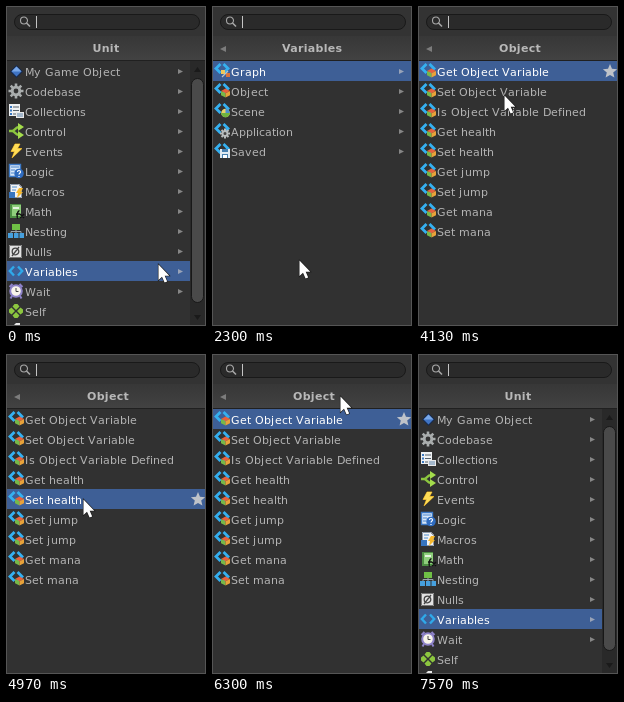
Write an HTML page with a canvas that moves like this. It is 200x320 px and loops after 9430 ms.

```html
<!DOCTYPE html>
<html lang="en">
<head>
<meta charset="utf-8">
<title>Unit finder</title>
<style>
html, body { margin: 0; width: 100%; height: 100%; overflow: hidden; background: #313131; }
canvas { display: block; }
</style>
</head>
<body>
<canvas id="stage" width="200" height="320"></canvas>
<script>
const ctx = document.getElementById('stage').getContext('2d');
const LOOP = 9430, WIDTH = 200, HEIGHT = 320, LIST_TOP = 55, ROW = 20;
const FONT = '11px Verdana, "DejaVu Sans", sans-serif';

// Icons live in a 16 x 16 box; each part is [colour, path, stroke width or 0 for fill].
const GEAR = 'M8 .5V15.5M.5 8H15.5M2.7 2.7L13.3 13.3M13.3 2.7L2.7 13.3';
const ring = (x, y, r) => `M${x - r} ${y}a${r} ${r} 0 1 0 ${2 * r} 0a${r} ${r} 0 1 0 ${-2 * r} 0z`;
const page = [['#f2f2f2', 'M2 1H11L14 4V15H2z', 0], ['#8a97a8', 'M2.5 1.5H10.5L13.5 4.5V14.5H2.5z', 1]];
const BOLT = 'M7 1H12L9.5 5.5H14L4 15 6.5 8.5H3z';

const icons = {
  object: [['#16294d', 'M8.5 2L15 8.5 8.5 15 2 8.5z', 0], ['#3f74c4', 'M8.5 3.5L13.5 8.5 8.5 13.5 3.5 8.5z', 0],
    ['#79a8e8', 'M8.5 3.5L13.5 8.5H3.5z', 0]],
  codebase: [['#a9adad', GEAR, 2.6], ['#a9adad', ring(8, 8, 4), 2.5], ['#333', ring(8, 8, 2.4), 0]],
  collections: [['#eef1f3', 'M1 1H12V13H1z', 0], ['#3a78c0', 'M2 3H4V5H2zM2 6.5H4V8.5H2zM2 10H4V12H2z', 0],
    ['#55606a', 'M5 4H11M5 7.5H11M5 11H11', 1.2], ['#e8e8e8', 'M8 9H16V15H8z', 0], ['#5e86ae', 'M9 11H15M9 13H15', 1]],
  control: [['#8cc63f', 'M1 8H4C7 8 7 4 11 4M4 8C7 8 7 12 11 12', 2.5], ['#a4dc4c', 'M10 0L16 4 10 8zM10 8L16 12 10 16z', 0]],
  events: [['#c89016', BOLT, 1], ['#ffdc55', BOLT, 0]],
  logic: [['#d8e7f8', 'M1 1H13V14H1z', 0], ['#3c79c6', 'M1.5 1.5H12.5V13.5H1.5z', 1.4],
    ['#4683cc', 'M3 4H11M3 7H7M3 10H6', 1], ['#2f6cc0', ring(11, 10.5, 4.8), 0],
    ['#fff', 'M9.5 9C9.5 7 12.5 7 12.5 9 12.5 10 11 10 11 11.5M11 13V14', 1.2]],
  macros: [...page, ['#4c8ed0', 'M4 4H9M4 7H8', 1], ['#3775bf', 'M1 9H7V15H1z', 0],
    ['#f5b82e', 'M11 5H15L13 9H15L9 15 10 10H8z', 0]],
  math: [['#4d8f43', 'M2 1H13V15H2z', 0], ['#8fce7c', 'M4 2H13V13H4z', 0], ['#e5f4df', 'M5 4H11V6H5z', 0],
    ['#101010', 'M10 15C8.5 16 9 7 11.5 8M8 11H12M12 11L16 15M16 11L12 15', 1.4]],
  nesting: [['#9aa4ab', 'M8 5V9M3 11V8.5H13V11M8 8V11', 1], ['#6fbf45', 'M4 1H12V7H4z', 0],
    ['#46a0de', 'M0 10H5V15H0zM6 10H10.5V15H6zM11.5 10H16V15H11.5z', 0]],
  nulls: [['#e3e3e3', 'M1 2H14V15H1z', 0], ['#777', 'M1.5 2.5H13.5V14.5H1.5z', 1],
    ['#444', ring(7.5, 8.5, 3.3) + 'M4 13L11 4', 1.3]],
  variables: [['#2fa9ea', 'M6 3.5L1.8 8 6 12.5M10 3.5L14.2 8 10 12.5', 2.4]],
  wait: [['#8d82c8', 'M1.5 4L4.5 1M14.5 4L11.5 1M4 13L2.5 15.5M12 13L13.5 15.5', 2], ['#8d82c8', ring(8, 8, 6.8), 0],
    ['#f7f4ea', ring(8, 8, 4.8), 0], ['#444', 'M8 5V8.5H10.5', 1]],
  self: [['#8cc63f', 'M8 7L4.5 3.5 6.5 1H9.5L11.5 3.5zM8 9L4.5 12.5 6.5 15H9.5L11.5 12.5zM7 8L3.5 4.5 1 6.5V9.5L3.5 11.5zM9 8L12.5 4.5 15 6.5V9.5L12.5 11.5z', 0]],
  more: [['#e8e8e8', 'M5 3L8 0H12V8H5z', 0]]
};

// A variable icon: chevrons with a badge in the lower right.
const badge = (...parts) => [['#35b0f0', 'M6.5 1L2 5.5 6.5 10M9.5 1L14 5.5 9.5 10', 2.8], ...parts];
Object.assign(icons, {
  graph: badge(['#f0c75a', 'M7 7H11V11H7z', 0], ['#d9743c', 'M12 10H16V14H12z', 0], ['#b9c3c9', 'M8 14L14 8', 1.3]),
  cube: badge(['#e8603c', 'M11.5 5.5L16 8 11.5 10.2 7 8z', 0], ['#78b848', 'M7 8L11.5 10.2V14.5L7 12.3z', 0],
    ['#e8a23a', 'M16 8L11.5 10.2V14.5L16 12.3z', 0]),
  scene: badge(['#e9d36a', ring(11.5, 10, 4.3), 0], ['#6fb43f', 'M7.2 10A4.3 4.3 0 0 0 15.8 10z', 0],
    ['#4a8fd0', 'M11.5 5.7A4.3 4.3 0 0 1 15.8 10H11.5z', 0]),
  application: badge(['#b8bcbc', 'M11 5.5V15.5M6 10.5H16M7.5 7L14.5 14M14.5 7L7.5 14', 2],
    ['#b8bcbc', ring(11, 10.5, 3.2), 0], ['#444', ring(11, 10.5, 1.5), 0]),
  saved: badge(['#dfe9f1', 'M6 6H16V15H6z', 0], ['#477fae', 'M8 6H14V9H8zM8 11H14V15H8z', 0], ['#fff', 'M9 12H13V15H9z', 0])
});

const panels = [
  { title: 'Unit', titleX: 86.5, scroll: true, rows: [
    ['My Game Object', 'object'], ['Codebase', 'codebase'], ['Collections', 'collections'],
    ['Control', 'control'], ['Events', 'events'], ['Logic', 'logic'], ['Macros', 'macros'],
    ['Math', 'math'], ['Nesting', 'nesting'], ['Nulls', 'nulls'], ['Variables', 'variables'],
    ['Wait', 'wait'], ['Self', 'self', true], ['Super', 'more', true]] },
  { title: 'Variables', titleX: 70, rows: ['Graph', 'Object', 'Scene', 'Application', 'Saved']
    .map(name => [name, name === 'Object' ? 'cube' : name.toLowerCase()]) },
  { title: 'Object', titleX: 81, rows: ['Get Object Variable', 'Set Object Variable', 'Is Object Variable Defined',
    'Get health', 'Set health', 'Get jump', 'Set jump', 'Get mana', 'Set mana']
    .map(name => [name, 'cube', true]), stars: true }
];

const smooth = u => u * u * (3 - 2 * u);
const easeIn = u => u * u;
const easeOut = u => u * (2 - u);
const clamp = (v, lo, hi) => Math.min(hi, Math.max(lo, v));
const slide = (t, start) => smooth(clamp((t - start) / 250, 0, 1));

// Pointer stops: time, x, y, easing on the way there.
const stops = [
  [0, 152, 258], [320, 152, 258], [330, 151, 258], [450, 151, 258], [1000, 87, 260],
  [2210, 87, 260], [3030, 86, 89], [4650, 86, 89], [5360, 66, 219], [5400, 66, 219],
  [5570, 66, 175, easeIn], [6070, 128, 42, easeOut], [7100, 128, 42], [7270, 136, 42],
  [7410, 136, 42], [7560, 174, 42]
];

function pointerAt(t) {
  const i = stops.findIndex(s => s[0] > t);
  if (i < 0) return null;
  const [t0, x0, y0] = stops[i - 1], [t1, x1, y1, ease = smooth] = stops[i];
  const k = ease((t - t0) / (t1 - t0));
  return { x: Math.round(x0 + (x1 - x0) * k), y: Math.round(y0 + (y1 - y0) * k) };
}

function selections(t, pointer) {
  const hover = pointer ? Math.floor((pointer.y - LIST_TOP) / ROW) : 0;
  return [10, t > 3030 ? 1 : hover > 4 ? 0 : hover, t < 4660 ? 0 : clamp(hover, 0, 8)];
}

function rect(color, x, y, w, h) {
  ctx.fillStyle = color;
  ctx.fillRect(x, y, w, h);
}

function shape(color, d, line) {
  const path = new Path2D(d);
  ctx.fillStyle = ctx.strokeStyle = color;
  ctx.lineWidth = line;
  if (line) ctx.stroke(path); else ctx.fill(path);
}

function shade(y0, y1, top, bottom) {
  const g = ctx.createLinearGradient(0, y0, 0, y1);
  g.addColorStop(0, top);
  g.addColorStop(1, bottom);
  return g;
}

function pill(x, y, w, h, r, fill, stroke) {
  ctx.beginPath();
  ctx.roundRect(x, y, w, h, r);
  ctx.fillStyle = fill;
  ctx.fill();
  ctx.strokeStyle = stroke;
  ctx.lineWidth = 1;
  ctx.stroke();
}

function heading(str, x, y) {
  ctx.font = 'bold ' + FONT;
  ctx.letterSpacing = '0.3px';
  ctx.fillStyle = '#b8b8b8';
  ctx.fillText(str, x, y);
}

// Labels sit on the pixel grid: every glyph advances by whole pixels.
function label(str, x, y, color) {
  ctx.font = FONT;
  ctx.letterSpacing = '0px';
  ctx.fillStyle = color;
  for (const ch of str) {
    ctx.fillText(ch, x, y);
    x += Math.round(ctx.measureText(ch).width) + (' Ij'.includes(ch) ? 1 : 0);
  }
}

function star(cx, cy, r) {
  const pts = Array.from({ length: 10 }, (_, i) => {
    const a = i * Math.PI / 5 - Math.PI / 2, q = i % 2 ? r * 0.45 : r;
    return `${cx + q * Math.cos(a)} ${cy + q * Math.sin(a)}`;
  });
  shape('#bfc3c9', `M${pts.join('L')}z`, 0);
}

function drawSearch() {
  rect('#333', 0, 0, WIDTH, 30);
  pill(8.5, 8.5, 185, 15, 7.5, '#2a2a2a', '#191919');
  shape('#a8a8a8', ring(18, 14.5, 3.5), 1.1);
  shape('#a8a8a8', 'M20.5 17L24 20.5', 1.6);
  rect('#c4c4c4', 30, 10, 1, 12);
}

function drawScrollbar() {
  rect('#292929', 184, 55, 15, 265);
  pill(185.5, 72.5, 12, 224, 6, '#4a4a4a', '#181818');
  shape('#1a1a1a', 'M188 66L191.5 61 195 66zM188 309L191.5 314 195 309z', 0);
}

function drawPanel({ title, titleX, rows, scroll, stars }, x, selected) {
  ctx.save();
  ctx.translate(x, 0);
  ctx.beginPath();
  ctx.rect(0, 30, WIDTH, HEIGHT - 30);
  ctx.clip();
  rect('#313131', 0, 30, WIDTH, HEIGHT - 30);
  rect(shade(30, 54, '#373737', '#424242'), 0, 30, WIDTH, 24);
  rect('#202020', 0, 54, WIDTH, 1);
  heading(title, titleX, 46);
  if (!scroll) shape('#7c7c7c', 'M8 43L14 40V46z', 0);

  const right = scroll ? 184 : 199;
  rows.forEach(([name, icon, leaf], i) => {
    const y = LIST_TOP + i * ROW, on = i === selected;
    if (on) rect('#3e5f96', 1, y, right - 1, ROW);
    ctx.save();
    ctx.translate(2, y + 2);
    icons[icon].forEach(part => shape(...part));
    ctx.restore();
    label(name, 19, y + 15, on ? '#fff' : '#b4b4b4');
    if (!leaf) shape(on ? '#98a3b8' : '#868686', `M${right - 12} ${y + 8}L${right - 7} ${y + 10.5} ${right - 12} ${y + 13}z`, 0);
    if (on && stars) star(192, y + 10.5, 7.5);
  });
  if (scroll) drawScrollbar();
  rect('#1c1c1c', 0, 30, 1, HEIGHT);
  rect('#1c1c1c', WIDTH - 1, 30, 1, HEIGHT);
  ctx.restore();
}

function drawPointer({ x, y }) {
  const d = 'M.5 .5V16L4 12.7 6.6 18.5 9.2 17.4 6.7 11.7H11.3z';
  ctx.save();
  ctx.translate(x, y);
  shape('#1a1a1a', d, 1.2);
  shape('#fff', d, 0);
  ctx.restore();
}

function draw(t) {
  const pointer = pointerAt(t), selected = selections(t, pointer);
  const depth = slide(t, 1645) + slide(t, 3878) - slide(t, 6303) - slide(t, 6847);
  drawSearch();
  panels.forEach((panel, i) => {
    const x = Math.round((i - depth) * WIDTH);
    if (Math.abs(x) < WIDTH) drawPanel(panel, x, selected[i]);
  });
  ctx.strokeStyle = '#555';
  ctx.lineWidth = 1;
  ctx.strokeRect(0.5, 0.5, WIDTH - 1, HEIGHT - 1);
  if (pointer) drawPointer(pointer);
}

const start = performance.now();
function tick() {
  draw((performance.now() - start) % LOOP);
  requestAnimationFrame(tick);
}
tick();
</script>
</body>
</html>
```
